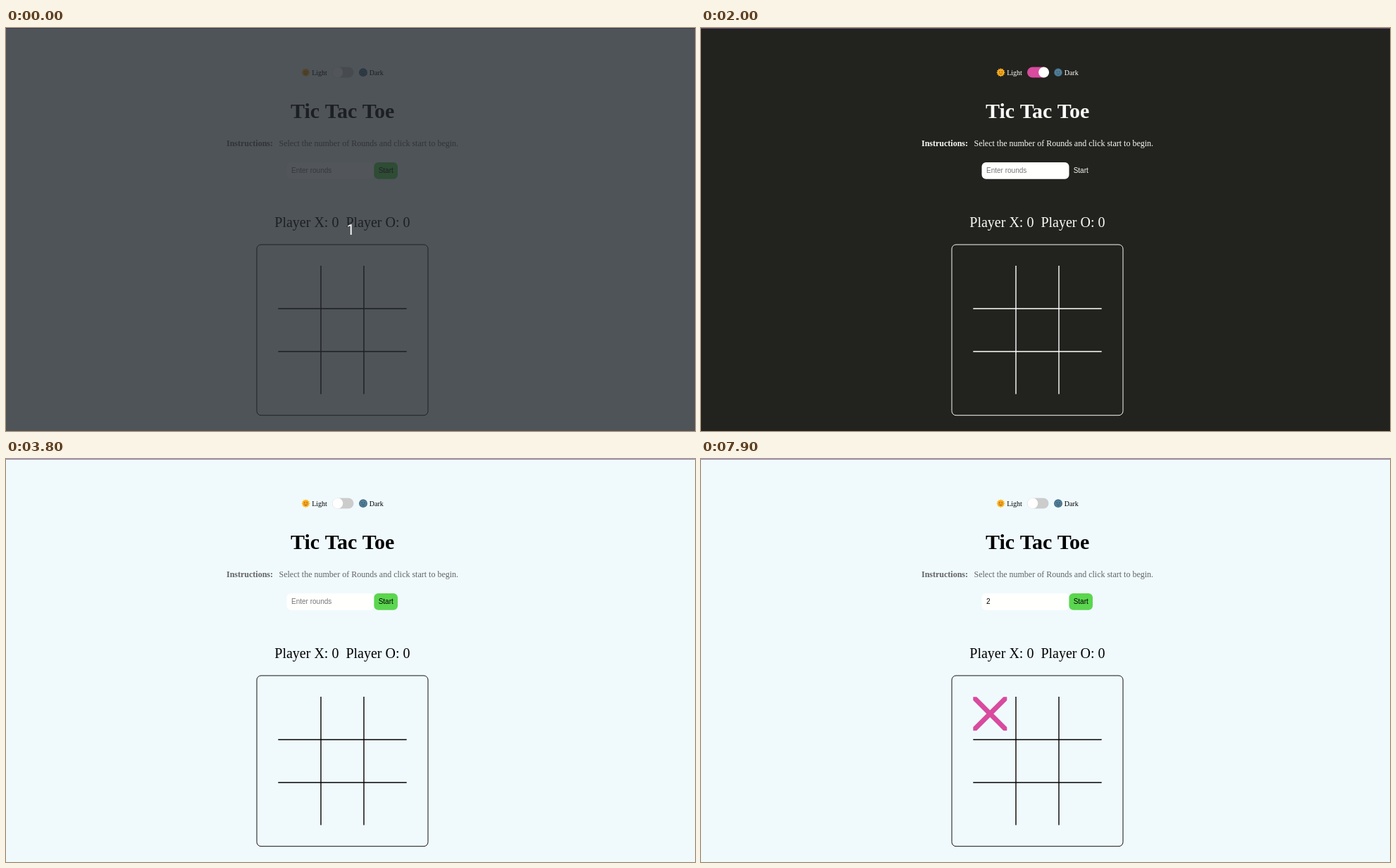
An HTML page with a canvas for the animation above (8 s loop, 978 px wide and 573 px high).

```html
<!DOCTYPE html>
<html lang="en">
<head>
<meta charset="utf-8">
<title>Tic Tac Toe</title>
<style>
  html, body { margin: 0; width: 100%; height: 100%; overflow: hidden; }
  canvas { display: block; }
</style>
</head>
<body>
<canvas id="stage" width="978" height="573"></canvas>
<script>
const ctx = document.getElementById('stage').getContext('2d');
const LOOP = 8000, STEP = 100;
const SERIF = '"Liberation Serif", "Times New Roman", serif';
const SANS = '"Liberation Sans", Arial, sans-serif';
const BLACK = [0, 0, 0], WHITE = [255, 255, 255];
const TRACK_OFF = [204, 204, 204], PINK = [216, 75, 158];

const DARK_ON = 1440, DARK_OFF = 3265;
const HOVERS = [[4080, 4410, 200], [6780, 7595, 100]];

const rgb = c => `rgb(${c.map(Math.round).join()})`;
const mix = (a, b, k) => rgb(a.map((v, i) => v + (b[i] - v) * k));

// The CSS "ease" curve: cubic-bezier(.25, .1, .25, 1)
function ease(x) {
  if (x <= 0) return 0;
  if (x >= 1) return 1;
  const curve = (a, b, s) => 3 * a * s * (1 - s) ** 2 + 3 * b * s * s * (1 - s) + s ** 3;
  let lo = 0, hi = 1;
  for (let i = 0; i < 20; i++) {
    const mid = (lo + hi) / 2;
    if (curve(.25, .25, mid) < x) lo = mid; else hi = mid;
  }
  return curve(.1, 1, lo);
}

// Rises from 0 to 1 at `on` and falls back at `off`
const pulse = (t, on, off, rise, fall = rise) =>
  ease((t - on) / rise) - ease((t - off) / fall);

function text(str, x, y, font, color, align = 'left') {
  ctx.font = font;
  ctx.fillStyle = color;
  ctx.textAlign = align;
  ctx.fillText(str, x, y);
}

function roundRect(x, y, w, h, r) {
  ctx.beginPath();
  ctx.roundRect(x, y, w, h, r);
}

function disc(x, y, r, color) {
  ctx.fillStyle = color;
  ctx.beginPath();
  ctx.arc(x, y, r, 0, Math.PI * 2);
  ctx.fill();
}

function line(x1, y1, x2, y2) {
  ctx.beginPath();
  ctx.moveTo(x1, y1);
  ctx.lineTo(x2, y2);
  ctx.stroke();
}

function face(x, y, color) {
  disc(x - 1.7, y - 1, .7, color);
  disc(x + 1.7, y - 1, .7, color);
  ctx.strokeStyle = color;
  ctx.lineWidth = .8;
  ctx.beginPath();
  ctx.arc(x, y + .6, 2, .3, Math.PI - .3);
  ctx.stroke();
}

function sun(x, y) {
  ctx.fillStyle = '#fbc01c';
  ctx.beginPath();
  for (let i = 0; i < 24; i++) {
    const a = i * Math.PI / 12, r = i % 2 ? 4.6 : 6.2;
    ctx.lineTo(x + r * Math.cos(a), y + r * Math.sin(a));
  }
  ctx.fill();
  disc(x, y, 4.1, '#f7a521');
  face(x, y, '#8a4a1c');
}

function moon(x, y) {
  disc(x, y, 5.9, '#3c647b');
  disc(x, y, 5, '#537f98');
  face(x, y, '#27485c');
}

function toggle(t) {
  const move = pulse(t, DARK_ON, DARK_OFF, 400);
  const tint = pulse(t, DARK_ON, DARK_OFF, 500);
  ctx.fillStyle = mix(TRACK_OFF, PINK, tint);
  roundRect(463, 55.5, 30.5, 15, 7.5);
  ctx.fill();
  disc(470.8 + 15.8 * move, 63, 7.5, '#fff');
}

function spinner(t) {
  if (t < 4500 || t >= 6400) return;
  ctx.fillStyle = '#ececec';
  ctx.fillRect(507, 197, 9, 11.5);
  if (t >= 5100) {
    ctx.fillStyle = '#d2d2d2';
    ctx.fillRect(507, 197, 9, 5.7);
  }
  ctx.fillStyle = '#444';
  for (const [base, tip] of [[201.6, 198.8], [204.2, 207]]) {
    ctx.beginPath();
    ctx.moveTo(508.7, base);
    ctx.lineTo(514.3, base);
    ctx.lineTo(511.5, tip);
    ctx.fill();
  }
}

function roundsInput(t) {
  ctx.fillStyle = '#fffffe';
  roundRect(398.5, 191, 124, 23.8, 6);
  ctx.fill();
  const value = t < 5700 ? '' : t < 6200 ? '1' : '2';
  text(value || 'Enter rounds', 405, 206, `10px ${SANS}`, value ? '#000' : '#757575');
  spinner(t);
}

function startButton(t, dark) {
  const hover = HOVERS.reduce((sum, [on, off, fall]) => sum + pulse(t, on, off, 200, fall), 0);
  const scale = 1 + .1 * hover;
  ctx.save();
  ctx.translate(539.2, 202.9);
  ctx.scale(scale, scale);
  if (!dark) {
    ctx.fillStyle = '#5bd64f';
    roundRect(-16.8, -11.9, 33.6, 23.8, 6);
    ctx.fill();
  }
  text('Start', 0, 3.1, `10px ${SANS}`, dark ? '#f8f8f6' : '#000', 'center');
  ctx.restore();
}

function board(t, dark, ink) {
  ctx.strokeStyle = dark ? '#f8f8f6' : '#111';
  ctx.lineWidth = 1;
  roundRect(356, 308, 243, 242.7, 6);
  ctx.stroke();

  ctx.strokeStyle = ink;
  ctx.lineWidth = 1.4;
  for (const offset of [0, 61]) {
    line(447 + offset, 338, 447 + offset, 520.5);
    line(386.3, 399 + offset, 568.7, 399 + offset);
  }
  if (t >= 7900) cross(386.3, 338.2, 48);
}

function cross(x, y, size) {
  ctx.save();
  ctx.beginPath();
  ctx.rect(x, y, size, size);
  ctx.clip();
  ctx.strokeStyle = rgb(PINK);
  ctx.lineWidth = 7;
  ctx.lineCap = 'square';
  line(x, y, x + size, y + size);
  line(x + size, y, x, y + size);
  ctx.restore();
}

function countdown() {
  ctx.fillStyle = 'rgba(36, 40, 46, .79)';
  ctx.fillRect(0, 0, 978, 573);
  text('1', 489, 294, '20px Roboto, sans-serif', '#fff', 'center');
}

function draw(t) {
  const dark = t >= DARK_ON && t < DARK_OFF;
  const fading = mix(BLACK, WHITE, pulse(t, DARK_ON, DARK_OFF, 500));
  const heading = dark ? '#fafaf8' : fading;
  const note = dark ? '#fafaf8' : '#636363';

  ctx.fillStyle = dark ? '#22221e' : '#f0fafd';
  ctx.fillRect(0, 0, 978, 573);
  ctx.fillStyle = dark ? '#66507c' : '#9584c4';
  ctx.fillRect(0, 0, 978, 1);

  sun(425.5, 63.2);
  text('Light', 434.2, 66.6, `10px ${SERIF}`, fading);
  toggle(t);
  moon(507, 63.2);
  text('Dark', 515.8, 66.6, `10px ${SERIF}`, fading);

  text('Tic Tac Toe', 477.7, 128, `bold 30px ${SERIF}`, heading, 'center');
  text('Instructions:', 313, 168, `bold 12px ${SERIF}`, note);
  text('Select the number of Rounds and click start to begin.', 387.5, 168, `12px ${SERIF}`, note);

  roundsInput(t);
  startButton(t, dark);

  text('Player X: 0', 381.3, 283, `20px ${SERIF}`, heading);
  text('Player O: 0', 482.4, 283, `20px ${SERIF}`, heading);
  board(t, dark, fading);
  if (t < 100) countdown();
}

const begin = performance.now();
function tick() {
  const t = (performance.now() - begin) % LOOP;
  draw(Math.floor(t / STEP) * STEP);
  requestAnimationFrame(tick);
}
tick();
</script>
</body>
</html>
```
